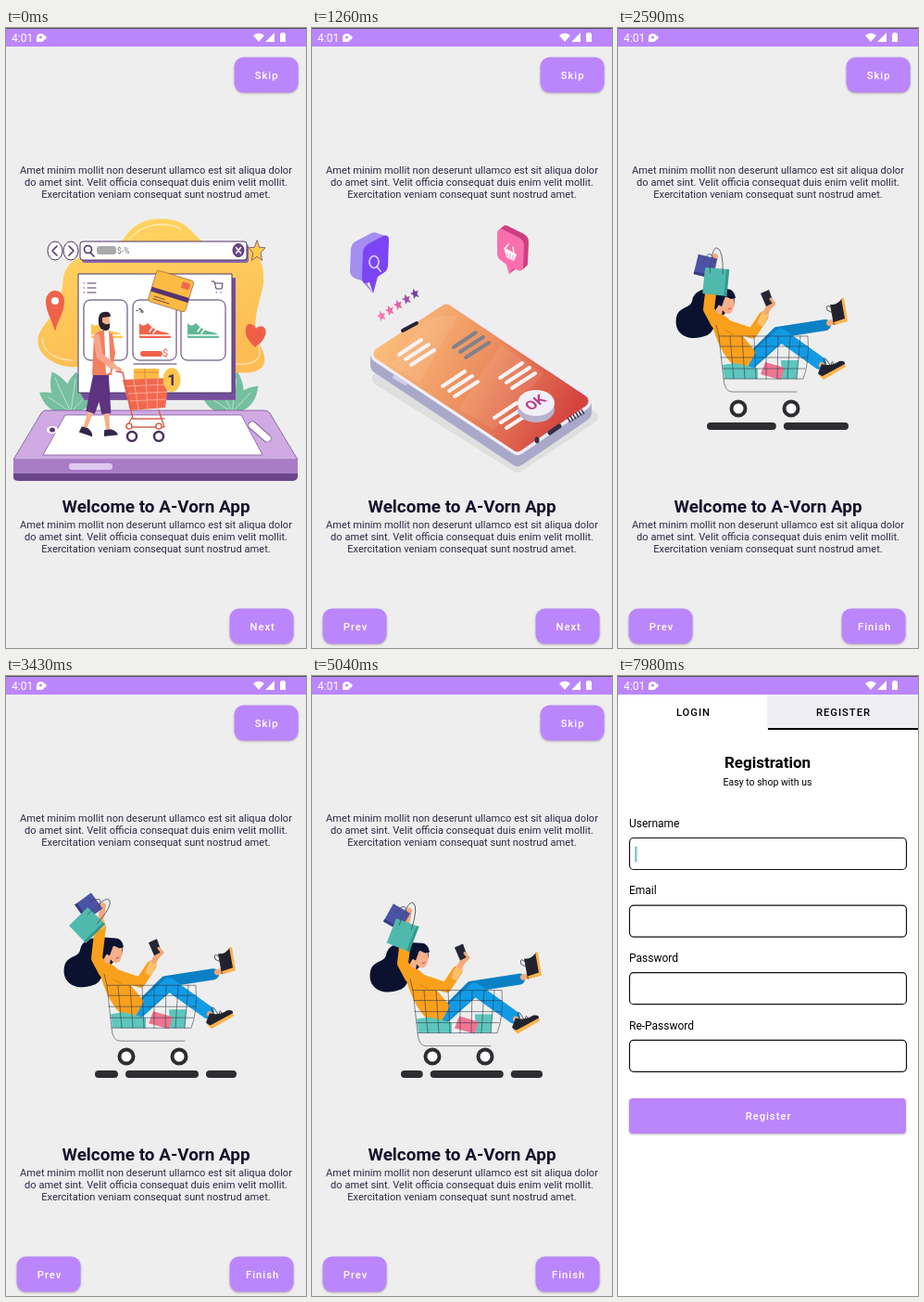
These frames come from a looping animation (324x668 px, 8 s). An HTML page:

```html
<!DOCTYPE html>
<html lang="en">
<head>
<meta charset="utf-8">
<title>Shop onboarding</title>
<style>
html, body { margin: 0; width: 100%; height: 100%; overflow: hidden; background: #eee; }
svg { display: block; width: 324px; height: 668px; font: 11.1px Roboto, sans-serif; }
.mid { text-anchor: middle; }
.btn { fill: #bb86fc; filter: drop-shadow(0 1px 1px rgba(0,0,0,.28)); }
.cap { font-size: 11.2px; font-weight: 500; letter-spacing: 1px; text-anchor: middle; }
.white { fill: #fff; }
.line { fill: none; stroke-linecap: round; stroke-linejoin: round; }
.ink { stroke: #4a3566; }
.skin { fill: #f6b08a; }
.form { font-size: 12px; }
.field { fill: #fff; stroke: #111; stroke-width: 1.2; }
</style>
</head>
<body>
<svg viewBox="0 0 324 668">
<defs>
  <linearGradient id="sun" x1="0" y1="0" x2=".3" y2="1"><stop stop-color="#ffd761"/><stop offset="1" stop-color="#fdbd55"/></linearGradient>
  <linearGradient id="glow" gradientUnits="userSpaceOnUse" x1="85" y1="320" x2="280" y2="420"><stop stop-color="#fbbd7a"/><stop offset=".5" stop-color="#ec8e5e"/><stop offset="1" stop-color="#d4433f"/></linearGradient>
  <clipPath id="road"><rect x="96" y="425" width="153" height="8" rx="4"/></clipPath>
  <path id="star" d="M0,-9L2.6,-3 9,-2.6 4.2,1.8 5.6,8.4 0,5 -5.6,8.4 -4.2,1.8 -9,-2.6 -2.6,-3Z"/>
  <path id="leaf" d="M0,0C-13,-12 -10,-28 0,-40C10,-28 13,-12 0,0Z"/>
  <g id="bush">
    <use href="#leaf" transform="rotate(-58)"/><use href="#leaf" transform="rotate(-25) scale(1.2)"/>
    <use href="#leaf" transform="rotate(8) scale(1.1)"/><use href="#leaf" transform="rotate(45)"/>
    <path class="line" stroke="#d9efe5" stroke-width=".7" d="M0,0L-24,-16M0,0L-17,-37M0,0L5,-36M0,0L20,-21"/>
  </g>
  <g id="shoe">
    <path d="M-17,-8Q-13,-3 -8,-8Q-1,0 11,2Q17,3 17,8H-17Z"/>
    <path class="line" stroke="#fff" stroke-width="1.5" d="M-3,-3L-6,1M1,-1L-2,3M-16,5H16"/>
  </g>
  <g id="leg">
    <path fill="#5d327f" d="M-9,-2H8L6,42H-4Z"/><path class="skin" d="M-2,42H4L3,59H-1Z"/>
    <path fill="#33264a" d="M-3,59H4Q11,62 11,66H-4Z"/>
  </g>
  <path id="rows" class="line" stroke-width="4" d="M-18,4L6,-12M-11,9L14,-7M-5,15L20,-1"/>
  <path id="slab" stroke-linejoin="round" d="M73,351L145,304 292,402 222,450Z"/>
  <path id="bubbleL" d="M55,241Q56,236 60,233L77,224Q83,222 83,228L82,256Q82,261 77,264L71,268 66,286 62,274Q54,277 54,270Z"/>
  <path id="bubbleR" d="M200,222Q201,216 206,218L224,227Q229,230 229,236L228,258Q228,264 222,262L217,260 213,267 210,256 205,252Q200,249 200,244Z"/>
  <g id="lorem" class="mid">
    <text x="162" y="157">Amet minim mollit non deserunt ullamco est sit aliqua dolor</text>
    <text x="162" y="170">do amet sint. Velit officia consequat duis enim velit mollit.</text>
    <text x="162" y="183">Exercitation veniam consequat sunt nostrud amet.</text>
  </g>
  <g id="copy" fill="#2d2a47">
    <use href="#lorem"/><use href="#lorem" y="382"/>
    <text class="mid" x="162" y="522" font-size="18.9" font-weight="700" fill="#14122b">Welcome to A-Vorn App</text>
  </g>
</defs>

<g id="intro">
  <rect width="324" height="668" fill="#eee"/>

  <g id="page0">
    <use href="#copy"/>
    <path fill="url(#sun)" d="M62,268C70,235 108,250 128,226C140,207 160,203 180,207C205,212 200,232 232,236C262,230 280,240 278,275C274,300 262,318 276,345C290,375 255,372 244,371L80,365C56,368 30,352 35,332C40,316 60,308 62,268Z"/>
    <path class="line" stroke="#fff" stroke-width=".8" d="M132,229C145,211 172,207 190,217M249,362C274,364 279,352 270,336M39,335C40,350 55,358 72,358"/>
    <g fill="#76bfa0"><use href="#bush" x="70" y="414"/><use href="#bush" x="244" y="414"/></g>
    <g class="ink" fill="#fff" stroke-width="1">
      <rect x="82" y="233" width="180" height="20" rx="3" fill="#8d68ae" stroke="none"/>
      <rect x="80" y="230" width="180" height="20" rx="3"/>
      <ellipse cx="53" cy="240" rx="8" ry="10"/><ellipse cx="70" cy="240" rx="8" ry="10"/>
      <path class="line" stroke-width="1.6" d="M55,235L50,240 55,245M68,235L73,240 68,245M91,242L95,246"/>
      <circle cx="88.500" cy="238.500" r="4" stroke-width="1.6"/>
      <rect x="98" y="235" width="21" height="9" rx="3" fill="#aaa" stroke="none"/>
      <ellipse cx="251" cy="239.500" rx="6" ry="7" fill="#68468b"/>
      <path class="line" style="stroke:#fff" stroke-width="1.5" d="M248.500,236.500L253.500,242.500M253.500,236.500L248.500,242.500"/>
    </g>
    <text x="120" y="243" font-size="8.500" fill="#777">$-%</text>
    <use href="#star" transform="translate(271,240) scale(1,1.25)" fill="#fecb4c" stroke="#6b4b63" stroke-width=".7"/>
    <path fill="#8b61a8" d="M84,269H248V401H84Z"/><path fill="#74509a" d="M244,270H248V400H84L80,393H244Z"/>
    <g class="ink" fill="#fff" stroke-width="1">
      <path d="M78,265H244V393H78Z"/>
      <rect x="84" y="293" width="47" height="65" rx="7"/><rect x="137" y="293" width="47" height="65" rx="7"/><rect x="189" y="293" width="48" height="65" rx="7"/>
      <path class="line" d="M88,275H97M88,280H97M88,285H97M84,275h.5M84,280h.5M84,285h.5M138,362H184M222,273H225L227,281H233L234,275H226M227,285h.5M232,285h.5"/>
    </g>
    <use href="#shoe" x="109" y="326" fill="#fdc653"/><use href="#shoe" x="161" y="326" fill="#f0644c"/><use href="#shoe" x="213" y="326" fill="#62b998"/>
    <rect x="145" y="348" width="24" height="6" rx="3" fill="#ef6149"/>
    <text x="169" y="354" font-size="11" fill="#ef6149">$</text><text x="140" y="307" font-size="8" font-weight="700" fill="#333">-%</text>
    <g id="card">
      <rect x="-21" y="-18" width="42" height="35" rx="3" fill="#fdbb43" stroke="#8a5b40" stroke-width=".6"/>
      <path fill="#56336f" d="M-21,1H21V6H-21Z"/><rect x="9" y="-14" width="9" height="7" rx="1" fill="#ef6a4c"/>
      <path class="line" stroke="#7b4d45" d="M-16,10H-4M-16,13H2"/>
    </g>
    <g id="pin">
      <path fill="#f0614a" d="M53,327C50,314 43,307 43,294A10,11 0 0 1 63,294C63,307 56,314 53,327Z"/>
      <circle class="white" cx="53" cy="294" r="4"/>
    </g>
    <path id="heart" fill="#ef5f48" d="M0,14C-6,8 -12,2 -10,-7C-8,-14 -1,-11 1,-6C6,-12 14,-7 11,1C9,7 5,10 0,14Z"/>
    <path fill="#cfaae3" stroke="#6d4788" stroke-width=".7" d="M43,412H279Q283,412 285,415L315,465H8L38,415Q40,412 43,412Z"/>
    <path fill="#fff" stroke="#754f92" stroke-width=".7" d="M64,417H254L277,460H40Z"/>
    <path class="line" stroke="#754f92" stroke-width="9" d="M266,428L282,442"/><path class="line" stroke="#fff" stroke-width="7.500" d="M266,428L282,442"/>
    <path fill="#a97cc6" d="M8,465H315V482Q315,486 310,486H13Q8,486 8,482Z"/><path fill="#6b4687" d="M8,480H315V484Q314,488 309,488H14Q8,488 8,484Z"/>
    <rect x="68" y="469" width="47" height="7" rx="3" fill="#dfc8ee"/><ellipse class="white" cx="50" cy="433" rx="6" ry="4"/><ellipse cx="50" cy="433" rx="3" ry="2.500" fill="#5b3974"/>
    <g id="legBack"><use href="#leg"/></g><g id="legFront"><use href="#leg"/></g>
    <path fill="#f0805f" d="M95,331Q105,321 115,330L118,350 114,374 93,374Z"/><path class="white" d="M106,326H111L113,371 108,373Z"/>
    <path class="line" stroke="#f7a58c" stroke-width="7" d="M98,333L101,353 115,364"/><path class="line" stroke="#f6b08a" stroke-width="4" d="M115,364L123,368"/>
    <ellipse class="skin" cx="106.500" cy="316" rx="5.500" ry="8"/>
    <path fill="#2b2031" d="M100,318Q99,306 106,306Q113,305 113,311L104,312 104,317Q109,321 112,318Q113,327 107,326Q101,325 100,318Z"/>
    <rect x="138" y="367" width="27" height="20" fill="#fdbb43"/><path stroke="#d98d34" d="M150,367V385M138,371H165"/>
    <path fill="#f2684f" d="M126,379L176,377 172,409 134,412Z"/>
    <path class="line" stroke="#ffb5a3" stroke-width=".8" d="M128,386L175,384M130,394L174,392M132,402L173,400M138,379L143,411M151,378L153,410M164,378L163,410"/>
    <path class="line" stroke="#d9604f" stroke-width="1.400" d="M119,370L126,371 137,421H171M136,420L130,430H171L165,412"/>
    <g fill="#fff" stroke="#4b335e" stroke-width="2.500"><circle cx="136" cy="440" r="5"/><circle cx="165" cy="440" r="5"/></g>
    <g fill="#fff" stroke="#d9604f" stroke-width="1.500"><circle cx="133" cy="429" r="3"/><circle cx="165" cy="429" r="3"/></g>
    <g id="badge"><ellipse rx="9.500" ry="13" fill="#fec64d"/><text class="mid" y="6" font-size="17" font-weight="700" fill="#4b315e">1</text></g>
  </g>

  <g id="page1">
    <use href="#copy"/>
    <path fill="#dfdfdf" stroke="#dfdfdf" stroke-width="14" stroke-linejoin="round" d="M72,378L145,330 302,419 222,472Z"/>
    <g fill="#aaa8c9" stroke="#aaa8c9" stroke-width="20"><use href="#slab" y="12"/><use href="#slab" y="8"/><use href="#slab" y="4"/></g>
    <use href="#slab" fill="#efedf8" stroke="#efedf8" stroke-width="20"/>
    <use href="#slab" fill="url(#glow)" stroke="url(#glow)" stroke-width="13"/>
    <path fill="#fff" opacity=".08" d="M125,312L158,309 116,383 85,362ZM204,341L250,373 196,433 158,410Z"/>
    <path class="line" stroke="#272337" stroke-width="4" d="M98,326L113,318"/>
    <g stroke="#f7f3f5"><use href="#rows" x="112" y="348"/><use href="#rows" x="159" y="382"/><use href="#rows" x="221" y="373"/><use href="#rows" x="215" y="416"/></g>
    <use href="#rows" x="171" y="340" stroke="#81818c"/>
    <path class="line" stroke="#d3d1e8" stroke-width="4" d="M89,376L101,383"/>
    <ellipse cx="243" cy="444" rx="2.500" ry="3.500" fill="#353047"/>
    <path class="line" stroke="#353047" stroke-width="5" d="M257,436L267,429"/>
    <path class="line" stroke="#353047" stroke-width="6" stroke-dasharray="1.500 2" style="stroke-linecap:butt" d="M277,423L293,413"/>
    <g id="ok">
      <ellipse cx="242" cy="411" rx="20" ry="14" fill="#b8b3cf"/><ellipse cx="242" cy="404" rx="20" ry="14" fill="#f2eff8"/>
      <text class="mid" transform="matrix(.8,-.5,.65,.6,245,407)" font-size="17" font-weight="700" fill="#bd3d8a">OK</text>
    </g>
    <g id="stars"></g>
    <g id="search">
      <path fill="#a68df2" d="M42,238Q43,232 47,230L64,221Q68,219 73,222L80,224 55,241V274L66,286 59,274 47,270Q41,267 41,262Z"/>
      <use href="#bubbleL" fill="#7b45f5"/>
      <g class="line" stroke="#dccfff" stroke-width="1.700"><ellipse cx="67" cy="252" rx="5" ry="6.500"/><path d="M70,257L74,262"/></g>
    </g>
    <g id="basket">
      <g fill="#cf3e82"><use href="#bubbleR" x="5" y="-4"/><use href="#bubbleR" x="2.500" y="-2"/></g>
      <use href="#bubbleR" fill="#fa70ae"/>
      <path class="white" d="M207,237L221,245 218,252 210,248Z"/>
      <path class="line" stroke="#fff" stroke-width="1.300" d="M209,238L212,234M218,243L217,237"/>
      <path class="line" stroke="#fa70ae" stroke-width=".8" d="M211,243V247M214,244V249M217,246V250"/>
    </g>
  </g>

  <g id="page2">
    <use href="#copy"/>
    <g id="rider">
      <path fill="#0b1230" d="M114,281C98,279 82,281 80,294C78,303 66,299 63,312C60,329 74,337 90,333C106,330 101,320 109,314L126,297Q126,281 114,281Z"/>
      <path class="skin" d="M113,291Q120,287 125,292L126,298 123,306Q118,311 113,304L111,315 103,308Z"/>
      <path fill="#0b1230" d="M110,283Q125,277 127,291L122,292 116,289 112,300 108,298Z"/>
      <path class="line" stroke="#c5474d" d="M119,303L122,302"/>
      <g class="line">
        <path stroke="#0b80c5" stroke-width="12" d="M138,362L172,328 224,320"/>
        <path stroke="#129be4" stroke-width="14" d="M138,365L176,331 218,361"/>
        <path stroke="#f6a878" stroke-width="6" d="M228,318L235,316M220,363L226,368"/>
        <path stroke="#087fbd" stroke-width=".8" d="M143,368L177,338"/>
      </g>
      <path fill="#22222f" d="M229,298Q237,299 242,291L246,316 233,320Z"/><path fill="#fdb34a" d="M241,291L244,291 248,316 234,320 233,317 245,313Z"/>
      <path fill="#22222f" d="M220,362Q230,365 239,359Q246,358 245,363L221,377 216,372Z"/><path fill="#fdb34a" d="M245,362L246,365 222,379 217,374 221,375Z"/>
      <path class="line" stroke="#333" stroke-width=".8" d="M233,304Q223,294 226,304L234,308M225,365Q219,352 225,357L230,365Q231,355 233,363"/>
      <path fill="#f9a01c" d="M99,310C108,304 118,310 124,319L149,349 137,371C117,363 106,339 99,310Z"/>
      <g class="line">
        <path stroke="#d98313" stroke-width="1" d="M111,322L125,331"/>
        <path stroke="#f9a01c" stroke-width="11" d="M115,319L145,329 157,311"/>
        <path stroke="#fbc16b" stroke-width="8" d="M155,317L159,308"/>
        <path stroke="#f6a878" stroke-width="6" d="M160,306L165,296"/>
        <path stroke="#f9a01c" stroke-width="12" d="M106,318L98,303 102,269"/>
        <path stroke="#fbc16b" stroke-width="10" d="M102,267V265"/>
        <path stroke="#f6a878" stroke-width="6" d="M102,262L105,246"/>
      </g>
      <path fill="#252735" d="M154,286L163,282 168,296 160,300Z"/><path class="line" stroke="#f6a878" stroke-width="3" d="M165,292L169,297 163,303"/>
      <g id="bags">
        <g transform="rotate(14)"><path fill="#4a53a5" d="M-18,3H3V25H-18Z"/><path fill="#353c84" d="M-18,22H3V25H-18Z"/></g>
        <path fill="#50b9ae" d="M-11,13L15,15 12,44 -14,41Z"/><path fill="#319a91" d="M12,15L15,15 12,44 9,43Z"/>
        <path class="line" stroke="#49495b" stroke-width=".8" d="M-13,7Q-5,-11 -1,8M-6,19Q-4,-9 2,-8Q9,-6 8,20"/>
      </g>
      <path fill="#5ec6bc" d="M113,363L127,361 151,367V378H115ZM176,358H195L193,378H177Z"/><path fill="#ee7590" d="M159,360L180,366 176,379 154,373Z"/>
      <path class="line" stroke="#263346" stroke-width=".55" d="M106,320L109,332H205Q207,360 200,378H114L109,332M110,343H205M111,355H204M113,367H202M121,332L125,378M134,332L137,378M147,332L149,378M160,332V378M173,332L172,378M186,332L183,378M197,332L193,378M114,378Q115,392 123,392H193"/>
    </g>
    <g fill="#fff" stroke="#2d2e32" stroke-width="4"><circle cx="130" cy="410" r="7.500"/><circle cx="187" cy="410" r="7.500"/></g>
    <g clip-path="url(#road)"><path id="dashes" class="line" stroke="#2d2e32" stroke-width="8" stroke-dasharray="71 16" d="M9,429H440"/></g>
  </g>

  <g transform="translate(-.4,-.4)">
    <rect class="btn" x="247" y="32" width="69" height="38" rx="10"/><text class="cap white" x="282" y="55">Skip</text>
    <g id="prev"><rect class="btn" x="12" y="626" width="69" height="38" rx="10"/><text class="cap white" x="47.500" y="649">Prev</text></g>
    <rect class="btn" x="242" y="626" width="69" height="38" rx="10"/>
    <rect id="press" class="white" x="242" y="626" width="69" height="38" rx="10"/>
    <text id="next" class="cap white" x="277.500" y="649">Next</text>
  </g>
</g>

<g id="account">
  <rect y="20" width="324" height="648" fill="#fff"/>
  <g id="login" class="form">
    <text class="mid" x="161.500" y="115" font-size="30" font-weight="700">Sign In</text>
    <text class="mid" x="161.500" y="140" font-size="10.500">Easy and fast buy high quality product</text>
    <g id="loginFields"></g>
    <text x="307" y="333" text-anchor="end">Forgot Password?</text>
    <rect class="btn" x="12" y="359" width="299" height="38" rx="4"/><text class="cap white" x="162.500" y="382">Login</text>
  </g>
  <g id="register" class="form">
    <text class="mid" x="161.500" y="99" font-size="17" font-weight="700">Registration</text>
    <text class="mid" x="161.500" y="118" font-size="10.500">Easy to shop with us</text>
    <g id="registerFields"></g>
    <rect class="btn" x="12" y="455" width="299" height="38" rx="4"/><text class="cap white" x="162.500" y="478">Register</text>
    <g id="caret"><rect x="18" y="183" width="4" height="18" fill="#d8f1ed"/><rect x="18.500" y="184" width="1.500" height="16" fill="#6bb5ac"/></g>
  </g>
  <rect id="tabPress" x="161" y="20" width="163" height="38" fill="#f0eef5"/>
  <text class="cap" x="81.500" y="43">LOGIN</text><text class="cap" x="243.500" y="43">REGISTER</text>
  <rect id="tabLine" y="56" width="162" height="2"/>
</g>

<rect width="324" height="20" fill="#bb86fc"/><rect width="324" height="1" fill="#555"/>
<g fill="#fff">
  <text x="6" y="15" font-size="12">4:01</text>
  <circle cx="37.500" cy="10.500" r="4.500"/><path d="M33,15V10L38,15ZM42,8L44,10 42,13Z"/><circle cx="37.500" cy="10" r="1.500" fill="#bb86fc"/>
  <path d="M267,8Q273,3 279,8L273,15ZM290,5V15H280ZM296,6H297V5H301V6H302V15H296Z"/>
</g>
</svg>

<script>
const LOOP = 8000, TAU = Math.PI * 2;
const el = id => document.getElementById(id);
const move = (id, transform) => el(id).setAttribute('transform', transform);
const show = (id, opacity) => el(id).setAttribute('opacity', opacity);
const ramp = (t, start, length) => Math.min(1, Math.max(0, (t - start) / length));
const easeOut = p => 1 - (1 - p) ** 3;
const easeInOut = p => p * p * (3 - 2 * p);
const wave = (t, period) => Math.sin(TAU * t / period);
const pulse = (t, start) => Math.sin(Math.PI * ramp(t, start, 400));

const fields = (labels, top) => labels.map((label, i) => {
  const y = top + i * 72.6;
  return `<text x="12" y="${y - 11.7}">${label}</text>
    <rect class="field" x="12.5" y="${y}" width="299" height="34" rx="4.5"/>`;
}).join('');
el('loginFields').innerHTML = fields(['Email', 'Password'], 196);
el('registerFields').innerHTML = fields(['Username', 'Email', 'Password', 'Re-Password'], 174.5);
el('stars').innerHTML = ['#f875b0', '#ef6cab', '#df62aa', '#a14fac', '#7444a6'].map((color, i) =>
  `<use href="#star" fill="${color}" transform="translate(${75 + i * 9},${310 - i * 6}) rotate(-20) scale(.52,.62)"/>`).join('');

function drawStore(t) {
  const step = Math.cos(TAU * t / 1000);
  move('legFront', `translate(103,374) rotate(${6 - 12 * step})`);
  move('legBack', `translate(103,374) rotate(${6 + 12 * step})`);
  move('pin', `translate(0,${-2 * wave(t, 1400)})`);
  move('card', `translate(178,${284 + 2 * wave(t, 1600)}) rotate(17)`);
  move('heart', `translate(269,330) scale(${1 + .06 * wave(t, 900)})`);
  move('badge', `translate(179,379) scale(${1 + .05 * wave(t, 1000)})`);
}

function drawPhone(t) {
  const s = t - 1260;
  move('search', `translate(0,${2 * wave(s, 1500)})`);
  move('basket', `translate(0,${-1 - 2 * wave(s, 1500)})`);
  move('ok', `translate(0,${Math.max(0, 2 * wave(s, 1500))})`);
}

function drawRider(t) {
  const s = t - 2590, phase = TAU * s / 980;
  move('rider', `translate(0,${3.3 - 3.3 * Math.cos(phase)})`);
  move('bags', `translate(105,245) rotate(${7.5 + 48 * Math.cos(phase + 1.73)})`);
  el('dashes').setAttribute('stroke-dashoffset', (s * .1629 % 87 + 87) % 87);
}

function draw(t) {
  const page = easeOut(ramp(t, 900, 300)) + easeOut(ramp(t, 2050, 300));
  for (let i = 0; i < 3; i++) move('page' + i, `translate(${324 * (i - page)},0)`);
  drawStore(t);
  drawPhone(t);
  drawRider(t);
  show('prev', page > .5 ? 1 : 0);
  show('press', .24 * (pulse(t, 750) + pulse(t, 1900) + pulse(t, 3550)));
  el('next').textContent = page > 1.5 ? 'Finish' : 'Next';

  const open = easeOut(ramp(t, 5400, 220));
  show('account', open);
  move('account', `translate(0,${40 * (1 - open)})`);
  const tab = easeInOut(ramp(t, 7400, 300));
  move('login', `translate(${-324 * tab},0)`);
  move('register', `translate(${324 * (1 - tab)},0)`);
  move('tabLine', `translate(${162 * tab},0)`);
  show('tabPress', ramp(t, 7330, 200));
  show('caret', t > 7750 ? 1 : 0);
}

function tick() {
  draw(performance.now() % LOOP);
  requestAnimationFrame(tick);
}
tick();
</script>
</body>
</html>
```
